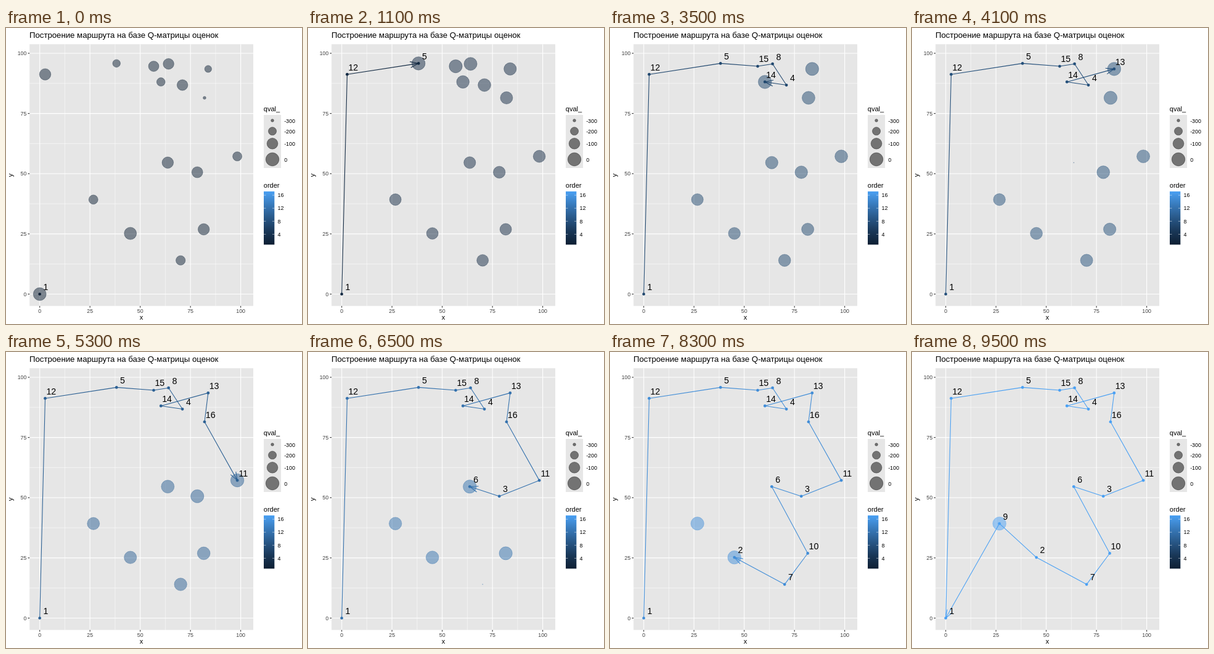
Recreate the animation shown at these times as an HTML page. Size 480x480 px, loop 10000 ms.

```html
<!DOCTYPE html>
<html lang="ru">
<head>
<meta charset="utf-8">
<title>Построение маршрута</title>
<style>
  html, body { margin: 0; width: 100%; height: 100%; overflow: hidden; background: #fff; }
  svg { display: block; width: 480px; height: 480px; font-family: "Liberation Sans", Arial, sans-serif; }
  .tick { font-size: 8.8px; fill: #404040; }
  .key { font-size: 8.8px; }
  .name { font-size: 11px; }
  .title { font-size: 13.2px; }
  .label { font-size: 14.2px; text-anchor: middle; }
  .mid { text-anchor: middle; }
  .end { text-anchor: end; }
  .bubble { fill-opacity: .5; stroke-opacity: .5; stroke-width: .71; }
  .route { fill: none; stroke-width: 1.07; stroke-linejoin: round; }
</style>
</head>
<body>
<svg id="plot" viewBox="0 0 480 480"></svg>
<script>
const svg = document.getElementById('plot');
const LOW = [14, 31, 51], HIGH = [74, 160, 243];
const GRAY = '#e6e6e6';
const LOOP = 10000, FIRST = 500, HOLD = 600, STEPS = 17;
const HEAD = 14.2, SPREAD = Math.PI / 9;
const px = v => 54.7 + v * 3.259;
const py = v => 431.5 - v * 3.905;

function add(tag, attrs, parent = svg, text) {
  const el = document.createElementNS('http://www.w3.org/2000/svg', tag);
  for (const k in attrs) el.setAttribute(k, attrs[k]);
  if (text !== undefined) el.textContent = text;
  return parent.appendChild(el);
}
const line = (x1, y1, x2, y2, stroke, width) =>
  add('line', { x1, y1, x2, y2, stroke, 'stroke-width': width });
const write = (x, y, cls, text) => add('text', { x, y, class: cls }, svg, text);

// Visiting order: id, x, y, bubble radius at the start
const stops = [
  [1, 0, 0, 10.8], [12, 2.7, 91.25, 9.6], [5, 38.2, 95.8, 6.6], [15, 56.7, 94.6, 8.8],
  [8, 64.1, 95.6, 9.1], [4, 71, 86.8, 9.1], [14, 60.3, 88.1, 7.2], [13, 83.8, 93.5, 6],
  [16, 82, 81.5, 2.7], [11, 98.3, 57.2, 7.8], [3, 78.4, 50.6, 9.3], [6, 63.7, 54.6, 9.6],
  [10, 81.6, 26.9, 9.6], [7, 70.1, 14, 8], [2, 45.1, 25.2, 10.3], [9, 26.7, 39.25, 7.8]
].map(([id, x, y, r]) => ({ id, x: px(x), y: py(y), r }));

// Stop with the lowest score at a step
const worst = { 8: 6, 12: 7 };

// Bubbles shrink with the number of stops still ahead of them
function radius(step, i) {
  if (step === 1) return stops[i].r;
  if (worst[step] === stops[i].id) return .8;
  return Math.max(9.8, 11.1 - .13 * (i - step + 1));
}

function color(step) {
  const f = ((step - 1) / (STEPS - 1)) ** 1.2;
  return 'rgb(' + LOW.map((c, i) => Math.round(c + (HIGH[i] - c) * f)) + ')';
}

function drawPanel() {
  const [l, t, r, b] = [38.2, 26.3, 401, 450.7];
  add('rect', { x: l, y: t, width: r - l, height: b - t, fill: GRAY });
  for (const [from, width] of [[12.5, .53], [0, 1.07]])
    for (let v = from; v <= 100; v += 25) {
      line(px(v), t, px(v), b, '#fff', width);
      line(l, py(v), r, py(v), '#fff', width);
    }
  for (let v = 0; v <= 100; v += 25) {
    line(px(v), b, px(v), b + 2.7, '#2b2b2b', 1.07);
    line(l - 2.7, py(v), l, py(v), '#2b2b2b', 1.07);
    write(px(v), 461.8, 'tick mid', v);
    write(33.4, py(v) + 3.2, 'tick end', v);
  }
  write(38, 16.3, 'title', 'Построение маршрута на базе Q-матрицы оценок');
  write(219.6, 473, 'name mid', 'x');
  add('text', { class: 'name mid', transform: 'translate(10.5 238.8) rotate(-90)' }, svg, 'y');
}

function drawLegend() {
  write(417.8, 135, 'name', 'qval_');
  add('rect', { x: 418, y: 141, width: 28, height: 86, fill: GRAY });
  [[150, 2.7, -300], [167.3, 6.9, -200], [187.4, 9.2, -100], [213, 11.1, 0]].forEach(([y, r, v]) => {
    add('circle', { cx: 432, cy: y, r: r - .35, class: 'bubble', fill: '#000', stroke: '#000' });
    write(451.2, y + 3.5, 'key', v);
  });

  write(417.8, 259, 'name', 'order');
  const ramp = add('linearGradient', { id: 'ramp', x1: 0, y1: 1, x2: 0, y2: 0 });
  for (let s = 1; s <= STEPS; s += 4)
    add('stop', { offset: (s - 1) / (STEPS - 1), 'stop-color': color(s) }, ramp);
  add('rect', { x: 418, y: 265, width: 17.3, height: 86.3, fill: 'url(#ramp)' });
  for (let v = 4; v <= 16; v += 4) {
    const y = 355.6 - v * 5.28;
    line(418, y, 421.4, y, '#fff', .5);
    line(431.9, y, 435.3, y, '#fff', .5);
    write(440.6, y + 3.2, 'key', v);
  }
}

function arrowHead(from, to) {
  const dir = Math.atan2(from.y - to.y, from.x - to.x);
  const tip = a => `${to.x + HEAD * Math.cos(dir + a)} ${to.y + HEAD * Math.sin(dir + a)}`;
  return `M${tip(SPREAD)}L${to.x} ${to.y}L${tip(-SPREAD)}`;
}

drawPanel();
drawLegend();
const bubbles = stops.map(({ x, y }) => add('circle', { cx: x, cy: y, class: 'bubble' }));
const dots = stops.map(({ x, y }) => add('circle', { cx: x, cy: y, r: 2.35 }));
const route = add('path', { class: 'route' });
const labels = stops.map(({ id, x, y }) => write(x + 9.8, y - 6.6, 'label', id));

function toggle(el, on) {
  el.setAttribute('visibility', on ? 'visible' : 'hidden');
}

function show(step) {
  const ink = color(step);
  const last = Math.min(step, stops.length);
  stops.forEach((_, i) => {
    const open = i >= last - 1;
    toggle(bubbles[i], open);
    if (open) bubbles[i].setAttribute('r', radius(last, i) - .35);
    bubbles[i].setAttribute('fill', ink);
    bubbles[i].setAttribute('stroke', ink);
    toggle(dots[i], i < step);
    dots[i].setAttribute('fill', ink);
    toggle(labels[i], i < step);
  });
  const path = [...stops, stops[0]].slice(0, step);
  let d = 'M' + path.map(p => `${p.x} ${p.y}`).join('L');
  if (step > 1) d += arrowHead(path[step - 2], path[step - 1]);
  route.setAttribute('d', d);
  route.setAttribute('stroke', ink);
}

let current = 0;
const start = performance.now();
function tick() {
  const t = (performance.now() - start) % LOOP;
  const step = t < FIRST ? 1 : 2 + Math.floor((t - FIRST) / HOLD);
  if (step !== current) show(current = step);
  requestAnimationFrame(tick);
}
tick();
</script>
</body>
</html>
```
